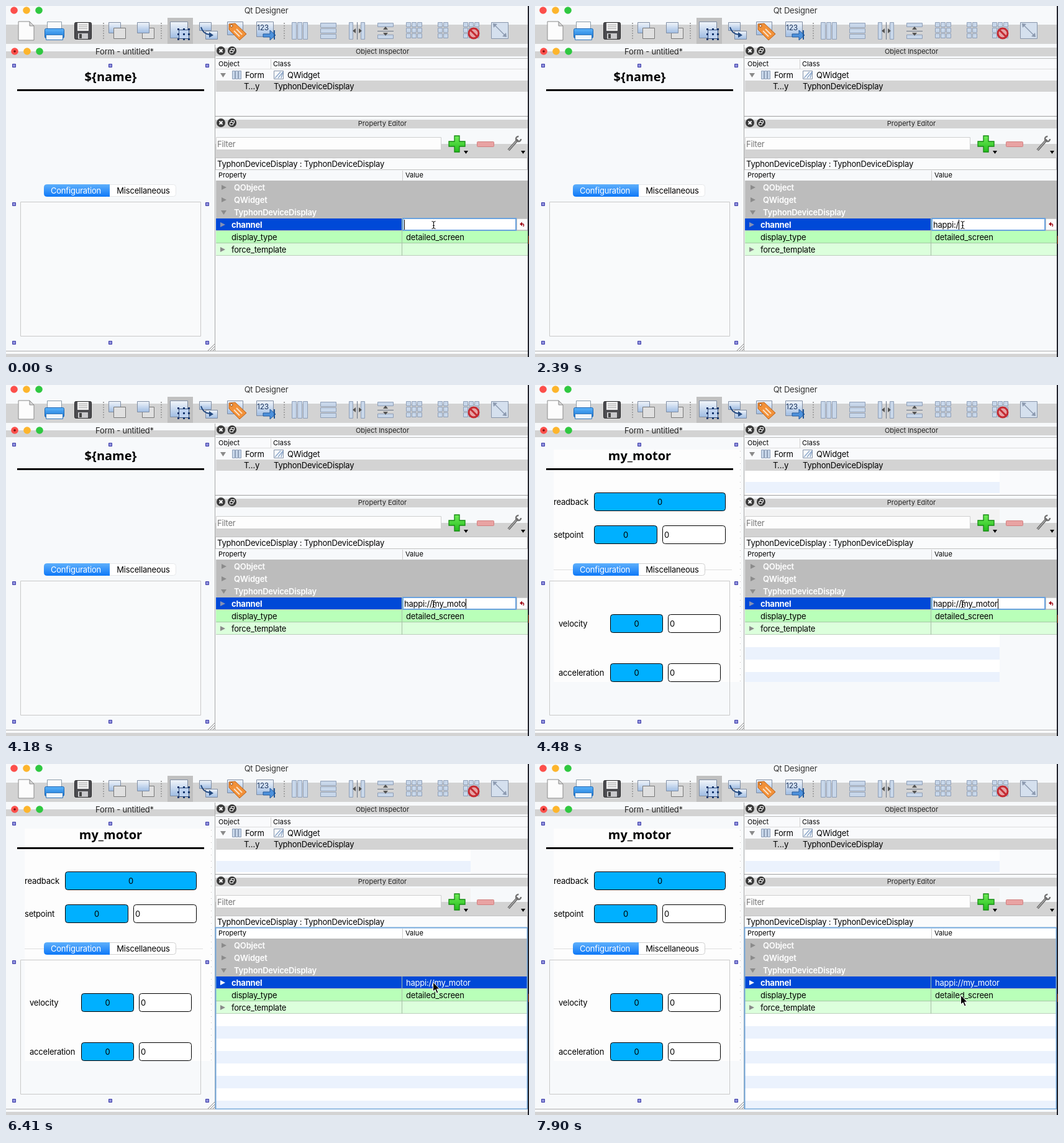
An HTML page with a canvas for the animation above (8000 ms loop, 842 px wide and 565 px high).

```html
<!DOCTYPE html>
<html>
<head>
<meta charset="utf-8">
<style>
html, body { margin: 0; width: 842px; height: 565px; overflow: hidden; }
canvas { display: block; }
</style>
</head>
<body>
<canvas id="stage" width="842" height="565"></canvas>
<script>
const c = document.getElementById('stage').getContext('2d');
const LOOP = 8000, PALE = '#f7f9fb', GREY = '#d3d3d3', STRIPE = '#ebf2fd';

// [start time, typed text, caret visible]
const typing = [
  [0, '', 1], [450, '', 0], [900, 'h', 1], [1050, 'ha', 1], [1340, 'hap', 1],
  [1490, 'happ', 1], [1640, 'happi', 1], [2090, 'happi:', 1], [2390, 'happi:/', 1],
  [2540, 'happi://', 1], [2690, 'happi://m', 1], [2980, 'happi://my', 1],
  [3280, 'happi://my_', 1], [3730, 'happi://my_m', 1], [4030, 'happi://my_mo', 1],
  [4180, 'happi://my_moto', 1], [4480, 'happi://my_motor', 1],
  [4920, 'happi://my_motor', 0], [5520, 'happi://my_motor', 1], [5970, 'happi://my_motor', 0]
];
const pointer = [[6410, 687, 351], [7610, 686, 362], [7750, 685, 371], [7900, 685, 372]];
const LOADED = 4480, COMMITTED = 6410;
const at = (steps, t) => steps.filter(s => s[0] <= t).pop();

function rect(x, y, w, h, fill) {
  c.fillStyle = fill;
  c.fillRect(x, y, w, h);
}
function box(x, y, w, h, fill, stroke, r = 0, lw = 1) {
  c.beginPath();
  c.roundRect(x + .5, y + .5, w - 1, h - 1, r);
  paint(fill, stroke, lw);
}
function paint(fill, stroke, lw = 1) {
  if (fill) { c.fillStyle = fill; c.fill(); }
  if (stroke) { c.strokeStyle = stroke; c.lineWidth = lw; c.stroke(); }
}
function poly(points, fill, stroke, lw) {
  c.beginPath();
  for (let i = 0; i < points.length; i += 2) c.lineTo(points[i], points[i + 1]);
  c.closePath();
  paint(fill, stroke, lw);
}
function line(x1, y1, x2, y2, color, lw = 1) {
  c.beginPath();
  c.moveTo(x1, y1);
  c.lineTo(x2, y2);
  paint(null, color, lw);
}
function disc(x, y, r, fill, stroke, lw) {
  c.beginPath();
  c.arc(x, y, r, 0, 7);
  paint(fill, stroke, lw);
}
function text(s, x, y, { size = 13, color = '#000', weight = 400, align = 'left', family = 'Inter' } = {}) {
  c.font = `${weight} ${size}px ${family}, sans-serif`;
  c.letterSpacing = family === 'Inter' && size > 11 ? '-0.2px' : '0px';
  c.textAlign = align;
  c.fillStyle = color;
  c.fillText(s, x, y + Math.round(size * .36));
}
const centered = (s, x, y, style) => text(s, x, y, { ...style, align: 'center' });
function gradient(y1, y2, a, b) {
  const g = c.createLinearGradient(0, y1, 0, y2);
  g.addColorStop(0, a);
  g.addColorStop(1, b);
  return g;
}
// Pale strip with a grey band from y1 to y2.
function bar(x, y, w, h, y1, y2) {
  rect(x, y, w, h, PALE);
  rect(x, y1, w, y2 - y1, GREY);
}
function lights(x, y) {
  ['#fc4f4b', '#fdb52c', '#2fc840'].forEach((color, i) => disc(x + i * 20, y, 5.8, color));
}
function triangle(x, y, open, color = '#8a8a8a') {
  poly(open ? [x - 4, y - 3, x + 5, y - 3, x + .5, y + 4]
            : [x - 3, y - 4, x + 5, y, x - 3, y + 4], color);
}

function pane(x, y, w, h) {
  box(x, y, w, h, gradient(y, y + h, '#f4f7fb', '#9dbbe2'), '#7f8da3');
}
function sheet(x, y) {
  box(x, y, 20, 18, '#e0e0e0', '#777');
}
function cells(x, y, cols, rows, w, h, gap) {
  for (let i = 0; i < cols; i++)
    for (let j = 0; j < rows; j++)
      box(x + i * (w + gap), y + j * (h + gap), w, h, '#c8d7ea', '#8f9fb7');
}
function separator(x) {
  for (let y = 27; y < 54; y += 4) rect(x, y, 2, 2, '#a3a3a3');
}
function noEntry(x, y) {
  disc(x, y, 8, '#e6a3a5', '#c52a31', 3);
  line(x - 5, y - 5, x + 5, y + 5, '#c52a31', 3);
}

function toolbar() {
  bar(0, 0, 842, 62, 30, 61);
  lights(13, 7);
  centered('Qt Designer', 419, 7, { color: '#333' });
  [156, 249, 447].forEach(separator);
  rect(260, 19, 41, 42, '#c0c0c0');

  poly([20, 25, 38, 25, 45, 32, 45, 55, 20, 55], '#fcfcfc', '#8a8a8a');
  poly([38, 25, 45, 32, 38, 32], '#d8d8d8', '#8a8a8a');

  box(66, 25, 24, 14, '#fafafa', '#8b9ba8');
  box(62, 36, 32, 16, gradient(36, 52, '#5fb5fa', '#1776d8'), '#1a65b4', 2);
  box(64, 46, 28, 9, '#eef5fb', '#3577b8');

  box(110, 26, 28, 28, '#4c4c50', '#29292b', 2);
  rect(115, 27, 18, 13, '#f0f0f0');
  [30, 33, 36].forEach(y => rect(117, y, 14, 1, '#aaa'));
  rect(116, 44, 16, 9, '#c9c9cc');
  rect(118, 45, 4, 7, '#444');

  pane(165, 26, 20, 18);
  sheet(173, 35);
  sheet(219, 35);
  pane(211, 26, 20, 18);

  pane(264, 25, 29, 27);
  box(278, 38, 17, 15, '#bed2ef', '#35527f');
  for (const x of [276, 285, 293]) for (const y of [36, 44, 52]) rect(x, y, 3, 3, '#15356c');

  pane(311, 26, 20, 14);
  pane(321, 40, 20, 14);
  c.beginPath();
  c.moveTo(314, 34);
  c.quadraticCurveTo(317, 45, 328, 46);
  paint(null, '#244a80', 2);
  poly([327, 42, 334, 47, 327, 51], '#244a80');

  pane(356, 25, 26, 22);
  poly([359, 29, 369, 28, 387, 45, 376, 55, 359, 38], '#f29139', '#b8601a');
  disc(363, 32, 2, '#fff', '#8b4510');
  line(367, 40, 376, 49, '#fbe0c4', 2);
  line(371, 37, 380, 46, '#fbe0c4', 2);

  pane(403, 25, 28, 25);
  text('123', 404, 35, { size: 12, color: '#1c355e' });
  poly([414, 45, 425, 45, 425, 39, 434, 47, 425, 55, 425, 50, 414, 50], '#4d91dc', '#23599a');
  rect(431, 39, 2, 15, '#23599a');

  cells(460, 26, 3, 1, 8, 28, 1);
  cells(506, 27, 1, 3, 26, 8, 1);
  cells(552, 26, 2, 1, 7, 28, 12);
  line(565.5, 26, 565.5, 54, '#6a7587');
  poly([558, 40, 563, 36, 563, 44], '#555');
  poly([573, 40, 568, 36, 568, 44], '#555');
  cells(598, 27, 1, 2, 26, 7, 12);
  line(598, 40.5, 624, 40.5, '#6a7587');
  poly([611, 33, 607, 38, 615, 38], '#555');
  poly([611, 48, 607, 43, 615, 43], '#555');
  cells(644, 26, 3, 3, 8, 8, 1);
  cells(695, 26, 2, 3, 8, 8, 1);
  cells(736, 26, 3, 3, 8, 8, 1);
  noEntry(753, 44);
  box(781, 26, 28, 27, '#d5e0ee', '#8795aa');
  line(786, 30, 803, 47, '#8c9ab0', 1.5);
  poly([784, 28, 791, 29, 785, 35], '#8c9ab0');
  poly([806, 50, 799, 49, 805, 43], '#8c9ab0');
}

function field(x, y, w, blue) {
  box(x, y, w, 30, blue ? '#00b0ff' : '#fff', '#000', 4);
  if (blue) centered('0', x + w / 2, y + 15);
  else text('0', x + 3, y + 15);
}

function form(loaded) {
  rect(0, 62, 337, 494, PALE);
  bar(0, 62, 337, 22, 73, 84);
  lights(14, 73);
  disc(14, 73, 1.8, '#7c0d0b');
  centered('Form - untitled*', 191, 73, { color: '#222' });
  if (loaded) {
    rect(30, 104, 302, 374, '#fdfdfd');
    for (let y = 106; y < 478; y += 10) rect(330, y, 1, 1, '#bbb');
  }
  centered(loaded ? 'my_motor' : '${name}', 168.5, 114, { size: 20, weight: 700, family: 'Noto Sans' });
  rect(18, 134, 301, 3, '#000');

  box(23, 315, 291, 217, loaded ? null : '#f9fafb', '#c9c9c9');
  if (loaded) {
    rect(30, 297, 287, 1, '#dedede');
    text('readback', 30, 188);
    field(95, 173, 212, true);
    text('setpoint', 30, 241);
    field(95, 226, 102, true);
    field(205, 226, 102);
    [['velocity', 384], ['acceleration', 463]].forEach(([label, y]) => {
      text(label, 38, y);
      field(121, y - 15, 85, true);
      field(214, y - 15, 85);
    });
  }
  const blue = gradient(287, 307, '#5fb0fb', '#0d78f8');
  box(160, 287, 114, 20, '#fff', loaded ? '#d0d0d0' : '#e6e8ea', 4);
  box(61, 287, 106, 20, blue, blue, 4);
  rect(163, 287, 4, 20, blue);
  centered('Configuration', 112.5, 297, { color: '#fff' });
  centered('Miscellaneous', 221, 297);

  for (const x of [10, 165, 321])
    for (const y of [93, 316, 539])
      if (x !== 165 || y !== 316) box(x, y, 6, 6, '#8f90dc', '#3c3ca8');
  for (let i = 3; i < 12; i += 4) line(336 - i, 555, 336, 555 - i, '#888');
  rect(336, 62, 1, 494, '#a9a9a9');
}

function dockTitle(name, y) {
  bar(337, y - 11, 503, 22, y - 6, y + 8);
  disc(346, y - 1, 7, '#3b3b3b');
  line(343.5, y - 3.5, 348.5, y + 1.5, '#fff', 1.8);
  line(348.5, y - 3.5, 343.5, y + 1.5, '#fff', 1.8);
  disc(364, y - 1, 7, '#3b3b3b');
  box(362, y - 5, 6, 5, null, '#fff');
  box(360, y - 2, 6, 5, '#3b3b3b', '#fff');
  centered(name, 606, y, { size: 11, color: '#222' });
}

function inspector(loaded) {
  rect(337, 62, 503, 116, PALE);
  dockTitle('Object Inspector', 73);
  rect(338, 84, 502, 93, '#f9fafc');
  if (loaded) {
    rect(338, 138, 410, 39, '#fff');
    rect(338, 156, 410, 18, STRIPE);
  }
  rect(338, 84, 502, 1, '#bbb');
  text('Object', 342, 93, { size: 11 });
  text('Class', 430, 93, { size: 11 });
  rect(426, 86, 1, 15, '#d0d0d0');
  rect(338, 101, 502, 1, '#ddd');
  rect(338, 120, 502, 18, GREY);
  triangle(349, 111, true);
  cells(364, 104, 3, 1, 5, 14, 0);
  text('Form', 385, 111);
  box(431, 104, 16, 14, '#f7f9fb', '#8795aa');
  for (let x = 433; x < 445; x += 5) line(x, 116, Math.min(x + 9, 446), 106, '#8fa9cb', 1.5);
  text('QWidget', 453, 111);
  text('T…y', 383, 129);
  text('TyphonDeviceDisplay', 431, 129);
  rect(337, 177, 503, 1, '#a0a0a0');
}

function editorTools(loaded) {
  dockTitle('Property Editor', 189);
  bar(337, 200, 503, 44, 222, 244);
  if (loaded) rect(337, 200, 411, 22, '#f3f3f3');
  box(338, 211, 363, 21, '#fdfdfd', '#cfcfcf');
  text('Filter', 340, 222, { color: '#777' });

  poly([722, 209, 730, 209, 730, 218, 739, 218, 739, 226, 730, 226, 730, 235, 722, 235,
        722, 226, 713, 226, 713, 218, 722, 218], gradient(209, 235, '#70ec58', '#22bd1b'), '#158a12', 1.3);
  poly([737, 233, 744, 233, 740.5, 238], '#000');
  box(758, 218, 28, 9, '#e9a3a3', '#d08080', 1);
  line(809, 232, 824, 215, '#626262', 4);
  line(809, 232, 822, 217, '#b0b0b0', 1.5);
  c.beginPath();
  c.arc(825, 214, 4, 0, 4.8);
  paint(null, '#747474', 2.5);
  poly([829, 233, 836, 233, 832.5, 238], '#000');

  box(337, 244, 503, 20, '#fafbfc', '#c2c2c2');
  text('TyphonDeviceDisplay : TyphonDeviceDisplay', 340, 254);
}

function valueEditor(t) {
  const [, typed, caret] = at(typing, t);
  rect(638, 341, 184, 21, '#6aa2de');
  rect(640, 343, 180, 17, '#fff');
  text(typed, 641, 352);
  if (caret) rect(Math.round(641 + c.measureText(typed).width), 344, 1, 16, '#000');
  box(822, 342, 18, 19, '#fbfbfb', '#ccc');
  poly([827, 351, 831, 347.5, 831, 354.5], '#a1101c');
  c.beginPath();
  c.moveTo(830, 351);
  c.quadraticCurveTo(835, 350, 833, 355);
  paint(null, '#a1101c', 1.5);
}

function properties(t) {
  const loaded = t >= LOADED, done = t >= COMMITTED;
  rect(337, 264, 503, 292, done ? '#fff' : PALE);
  if (loaded) {
    const right = done ? 840 : 748, bottom = done ? 554 : 478;
    rect(338, 402, right - 338, bottom - 402, '#fff');
    for (let y = 422; y < bottom; y += 40) rect(338, y, right - 338, Math.min(20, bottom - y), STRIPE);
  }
  text('Property', 342, 272, { size: 11 });
  text('Value', 643, 272, { size: 11 });
  rect(638, 265, 1, 16, '#ccc');
  rect(338, 281, 502, 61, '#bcbcbc');
  ['QObject', 'QWidget', 'TyphonDeviceDisplay'].forEach((name, i) => {
    triangle(350, 292 + i * 20, i === 2, '#8b8b8b');
    text(name, 367, 292 + i * 20, { weight: 600, color: '#fff' });
  });

  rect(338, 342, 502, 19, '#0049d7');
  triangle(348, 352, false, done ? '#fff' : '#8390b5');
  text('channel', 363, 352, { weight: 700, color: '#fff' });
  rect(338, 361, 502, 1, '#b9c3b9');
  rect(338, 362, 502, 19, '#b9ffb9');
  rect(338, 381, 502, 1, '#a6c6a6');
  text('display_type', 363, 372);
  text('detailed_screen', 644, 372);
  rect(338, 382, 502, 19, '#dcffdc');
  rect(338, 401, 502, 1, '#bcd0bc');
  triangle(348, 392, false);
  text('force_template', 363, 392);
  rect(637, 342, 1, 60, '#a8bda8');

  if (done) {
    text('happi://my_motor', 644, 352, { color: '#fff' });
    box(337, 263, 503, 293, null, '#76a9dc', 0, 2);
  } else {
    valueEditor(t);
    rect(337, 555, 503, 1, '#b0b0b0');
  }
}

function cursor(t) {
  if (t >= COMMITTED) {
    const [, x, y] = at(pointer, t);
    c.save();
    c.translate(x, y);
    poly([.5, 0, .5, 15, 4, 12, 6.5, 18, 9, 17, 6.5, 11.2, 11, 11], '#000', '#fff', 1);
    c.restore();
    return;
  }
  line(688.5, 347, 688.5, 358, '#000');
  line(687, 353.5, 690, 353.5, '#000');
  for (const [y, d] of [[346.5, 1], [358.5, -1]]) {
    line(685.5, y, 688.5, y + d, '#000');
    line(691.5, y, 688.5, y + d, '#000');
  }
}

function draw(t) {
  const loaded = t >= LOADED;
  toolbar();
  form(loaded);
  inspector(loaded);
  editorTools(loaded);
  properties(t);
  rect(0, 555, 337, 1, '#b0b0b0');
  rect(0, 556, 840, 4, PALE);
  rect(0, 560, 840, 5, GREY);
  rect(840, 0, 2, 565, '#22232c');
  rect(841, 370, 1, 13, '#b45b20');
  cursor(t);
}

const start = performance.now();
function tick() {
  draw((performance.now() - start) % LOOP);
  requestAnimationFrame(tick);
}
tick();
</script>
</body>
</html>
```
